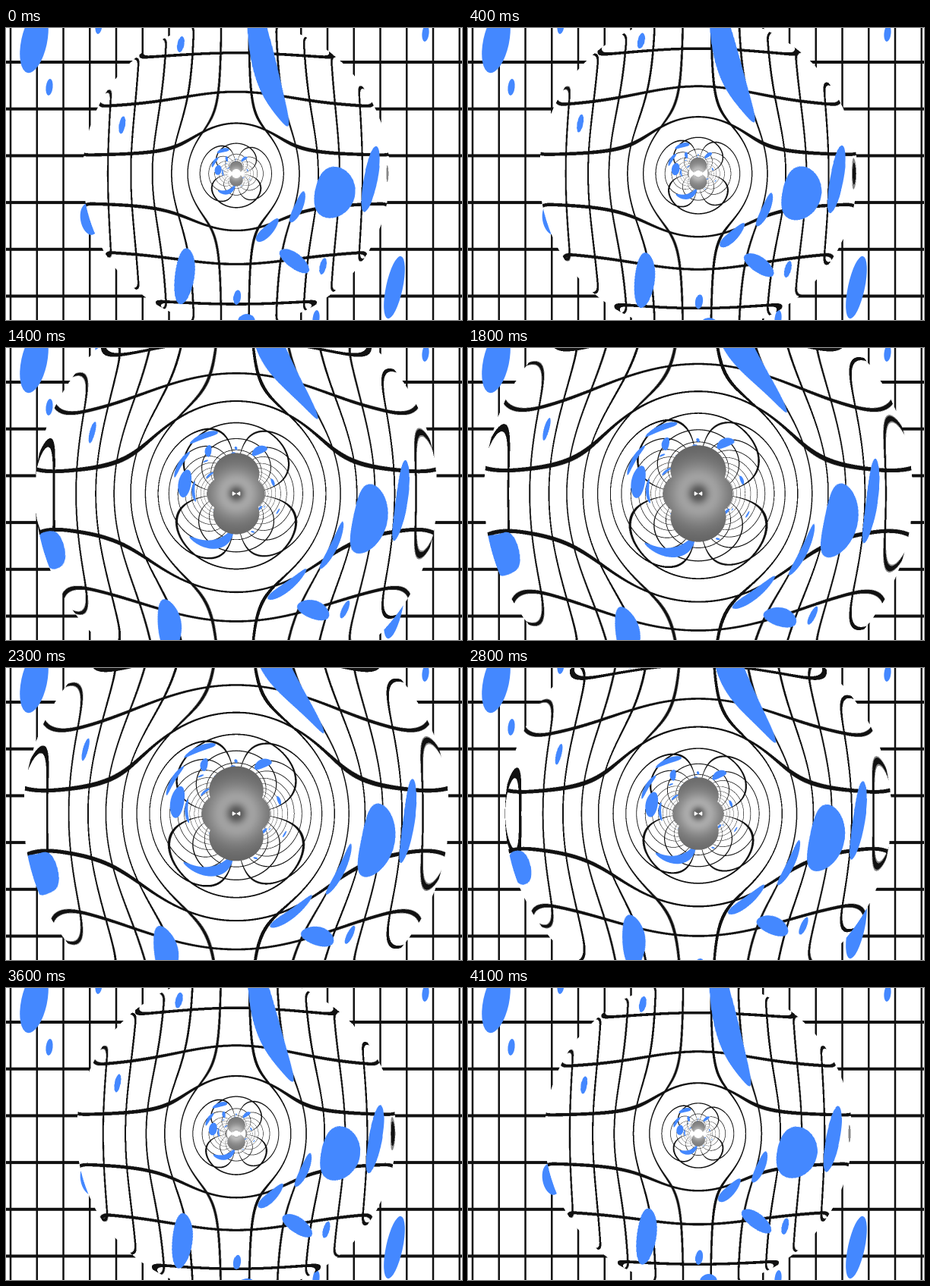
Write an HTML page with a canvas that moves like this. It is 600 px wide and 385 px high and loops after 4.2 s.

```html
<!DOCTYPE html>
<html>
<head>
<meta charset="utf-8">
<style>
  html, body { margin: 0; width: 100%; height: 100%; overflow: hidden; background: #fff; }
  canvas { display: block; }
</style>
</head>
<body>
<canvas id="stage" width="600" height="385"></canvas>
<script>
const W = 600, H = 385, SCALE = 2, CX = 303, CY = 192, BEND = 9.8;
const LOOP = 4200, STEP = 100, PERIOD = 4030;

function paintScene(g) {
  const blob = (x, y, rx, ry, deg) => {
    g.beginPath();
    g.ellipse(x, y, rx, ry, deg * Math.PI / 180, 0, 7);
    g.fill();
  };
  const speck = (x, y) => blob(x, y, 4.5, 11, 6);
  const seed = (x, y) => blob(x, y, 8, 16, 16);
  const leaf = (x, y, rx) => blob(x, y, rx, 42, 12);

  g.fillStyle = '#fff';
  g.fillRect(0, 0, W, H);
  g.fillStyle = '#111';
  for (let x = 6; x < W; x += 34.75) g.fillRect(x - 1.25, 0, 2.5, H);
  for (let y = 45; y < H; y += 61.7) g.fillRect(0, y - 2, W, 4);

  g.fillStyle = '#4488ff';
  speck(57, 78);
  speck(122, -3);
  speck(552, 7);
  speck(233.5, 30);
  speck(163.5, 132.5);
  speck(409.5, 306);
  speck(304, 343.5);
  speck(408, 383);
  seed(360, 223.5);
  seed(329, 241);
  leaf(37, 18, 17);
  leaf(511, 342, 11);
  leaf(241, 315, 12);
  leaf(470, 198.5, 10);
  blob(336.5, 60, 15, 90, -8);
  blob(415.5, 214, 32, 30, 0);
  blob(371, 294, 27, 9, 43);
  blob(110, 252, 12, 21, -10);
  blob(316, 379, 11, 11, 0);
}

const scene = document.createElement('canvas');
scene.width = W * SCALE;
scene.height = H * SCALE;
const sceneCtx = scene.getContext('2d', { willReadFrequently: true });
sceneCtx.scale(SCALE, SCALE);
paintScene(sceneCtx);
const texels = sceneCtx.getImageData(0, 0, scene.width, scene.height).data;

const ctx = document.getElementById('stage').getContext('2d', { willReadFrequently: true });
paintScene(ctx);
const flat = ctx.getImageData(0, 0, W, H);
const picture = ctx.createImageData(W, H);
const out = picture.data;
const sum = [0, 0, 0];

function addGrey(v) {
  for (let c = 0; c < 3; c++) sum[c] += v;
}

// Adds the light arriving at offset (dx, dy) from the lens centre.
function sample(dx, dy, { radius, mass, swell }) {
  const r = Math.hypot(dx, dy) + 1e-6;
  let pull = 0;
  if (r < radius) {
    // The extra pull near the rim folds the image back on itself.
    const rimWidth = mass / 320;
    const rim = Math.max(0, 1 - (radius - r) / rimWidth);
    pull = mass / r - BEND + 0.7 * rimWidth * rim ** 3;
  }
  const k = 1 - pull / r;
  const x = CX + dx * k, y = CY + dy * k;
  const offY = k < 0 && Math.abs(y - CY) > 183;
  if (offY || x < 0 || x >= W) {
    const core = offY ? 6 - 18 * swell : Math.max(5, 14 - 16 * swell);
    const bowtie = r < 5.5 && Math.abs(dy) < 0.6 * Math.abs(dx);
    if (r < core || bowtie) return addGrey(255);
    const depth = Math.log(mass / r / 750);
    return addGrey(88 + 72 * Math.exp(-1.6 * depth * depth) + 30 * (1 - swell));
  }
  const row = Math.max(0, Math.min(H * SCALE - 1, y * SCALE | 0));
  const i = (row * W * SCALE + (x * SCALE | 0)) * 4;
  for (let c = 0; c < 3; c++) sum[c] += texels[i + c];
}

function render(t) {
  const swell = (1 - Math.cos(2 * Math.PI * t / PERIOD)) / 2;
  const lens = {
    swell,
    radius: 202 + 76 * swell + 7 * swell ** 4,
    mass: 3500 + 11350 * swell + 2000 * swell ** 4
  };
  out.set(flat.data);
  for (let y = 0; y < H; y++) {
    for (let x = 0; x < W; x++) {
      const r = Math.hypot(x + 0.5 - CX, y + 0.5 - CY);
      if (r > lens.radius + 1) continue;
      const n = r < 100 ? 3 : 2;
      sum.fill(0);
      for (let j = 0; j < n; j++)
        for (let i = 0; i < n; i++)
          sample(x + (i + 0.5) / n - CX, y + (j + 0.5) / n - CY, lens);
      const p = (y * W + x) * 4;
      for (let c = 0; c < 3; c++) out[p + c] = sum[c] / (n * n);
    }
  }
  ctx.putImageData(picture, 0, 0);
}

let shown = -1;
function tick() {
  const step = Math.floor(performance.now() % LOOP / STEP);
  if (step !== shown) render((shown = step) * STEP);
  requestAnimationFrame(tick);
}
tick();
</script>
</body>
</html>
```
